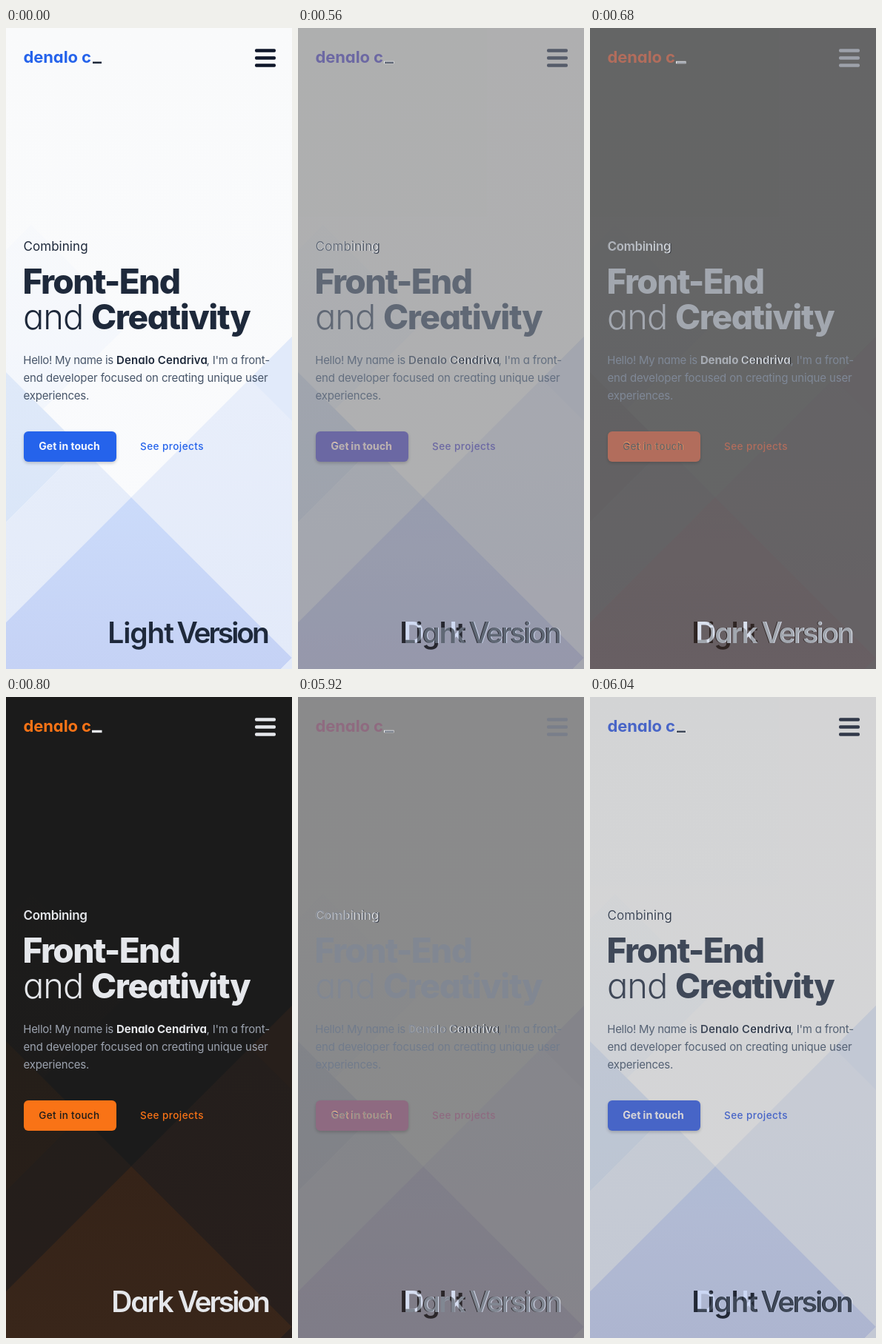
These frames come from a looping animation (386 by 866 pixels, 6100 ms). An HTML page:

```html
<!DOCTYPE html>
<html lang="en">
<head>
<meta charset="utf-8">
<title>Light and dark landing page</title>
<style>
  html, body { margin: 0; width: 100%; height: 100%; overflow: hidden; background: #f9fafc; }
  svg { position: absolute; left: 0; top: 0; width: 386px; height: 866px; }
  text {
    font-family: Inter, Lato, sans-serif;
    font-feature-settings: "cv11";
    font-optical-sizing: none;
    white-space: pre;
  }
</style>
</head>
<body>
<script>
const light = {
  id: 'light', bg: ['#f9fafb', '#fafbfd'], haze: '#eef3fc',
  left: ['#dfe9f9', '#dae6f8'], lowLeft: ['#e6edfa', '#e4ebf9'],
  right: ['#e9effb', '#e3eaf9'], corner: '#e1eafa', base: ['#cbdbfa', '#c5d2f5'],
  accent: '#2563eb', bars: '#0f172a', title: '#1e293b', body: '#475569',
  button: '#f4f7fd', shadow: 0.2,
  cursor: [117, 45.5, 12, 2.5],
  lead: [400, 0.05], name: [600, 0.1], call: [700, 14, 0],
  word: ['Light', 137.2, -1.1], shift: 0
};
const dark = {
  id: 'dark', bg: ['#1b1b1b', '#1b1b1b'], haze: '#1e1c1b',
  left: ['#241e19', '#281f19'], lowLeft: ['#231e1b', '#261e1b'],
  right: ['#231e1c', '#281f1c'], corner: '#271f1b', base: ['#352318', '#39261a'],
  accent: '#f97316', bars: '#e5e7eb', title: '#e5e7eb', body: '#9ca3af',
  button: '#1b1b1b', shadow: 0,
  cursor: [116, 44.8, 13.5, 3.4],
  lead: [600, -0.35], name: [700, -0.05], call: [500, 13.5, 0.35],
  word: ['Dark', 142.2, -2.1], shift: 1
};

const text = (str, x, y, size, weight, fill, gap = 0) =>
  `<text x="${x}" y="${y}" font-size="${size}" font-weight="${weight}" fill="${fill}" letter-spacing="${gap}">${str}</text>`;
const rect = (x, y, w, h, r, fill, more = '') =>
  `<rect x="${x}" y="${y}" width="${w}" height="${h}" rx="${r}" fill="${fill}" ${more}/>`;
const poly = (points, fill) => `<polygon points="${points}" fill="${fill}"/>`;

function page(t) {
  const fade = key => `<linearGradient id="${t.id}-${key}" x2="0" y2="1">
    <stop stop-color="${t[key][0]}"/><stop offset="1" stop-color="${t[key][1]}"/></linearGradient>`;
  const use = key => `url(#${t.id}-${key})`;
  const [leadW, leadGap] = t.lead, [nameW, nameGap] = t.name, [callW, callSize, callGap] = t.call;
  const [word, wordX, wordGap] = t.word;

  return `<svg id="${t.id}" viewBox="0 0 386 866">
    <defs>
      ${['bg', 'left', 'lowLeft', 'right', 'base'].map(fade).join('')}
      <linearGradient id="${t.id}-haze" x2="0" y2="1">
        <stop stop-color="${t.haze}" stop-opacity="0.2"/><stop offset="1" stop-color="${t.haze}" stop-opacity="0.6"/>
      </linearGradient>
      <filter id="${t.id}-soft" x="-20%" y="-50%" width="140%" height="200%"><feGaussianBlur stdDeviation="2"/></filter>
    </defs>
    ${rect(0, 0, 386, 866, 0, use('bg'))}
    ${poly('0,300 34,266 167,399 50,515 0,465', use('haze'))}
    ${poly('0,465 101.5,566.5 0,668', use('left'))}
    ${poly('0,668 101.5,566.5 169,634 0,803', use('lowLeft'))}
    ${poly('386,417 169,634 386,851', use('right'))}
    ${poly('386,417 329,474 386,531', t.corner)}
    ${poly('169,634 386,851 371,866 0,866 0,803', use('base'))}
    ${poly('386,851 371,866 386,866', t.right[1])}

    ${text('denalo c', 23.5, 47, 22, 700, t.accent, -0.1)}
    ${rect(...t.cursor, 0, t.title)}
    ${[28.25, 38.25, 48.25].map(y => rect(336, y, 28, 4.5, 1.8, t.bars)).join('')}

    ${text('Combining', 23.5, 300.5, 17, leadW, t.title, leadGap)}
    ${text('Front-End', 22.5, 359, 46, 800, t.title, -1.7)}
    ${text('and', 23, 407, 47, 300, t.title, -1)}
    ${text('Creativity', 115, 407, 46, 800, t.title, -1.4)}

    ${text('Hello! My name is', 23.3, 454, 15, 400, t.body, -0.3)}
    ${text('Denalo Cendriva', 149, 454, 15, nameW, t.title, nameGap)}
    ${text(", I'm a front-", 270.5, 454, 15, 400, t.body, -0.2)}
    ${text('end developer focused on creating unique user', 23.5, 478, 15, 400, t.body, -0.13)}
    ${text('experiences.', 23.5, 502, 15, 400, t.body, -0.2)}

    ${rect(24, 547, 125, 41, 6, '#000', `opacity="${t.shadow}" filter="url(#${t.id}-soft)"`)}
    ${rect(24, 545, 125, 41, 6, t.accent)}
    ${text('Get in touch', 44.3, 570.3, callSize, callW, t.button, callGap)}
    ${text('See projects', 181, 570.3, 13.5, 500, t.accent, 0.45)}

    ${text(word, wordX, 831, 39, 600, t.title, wordGap)}
    ${text('Version', 230.5 + t.shift, 831, 39, 600, t.title, -3.1)}
  </svg>`;
}

document.body.innerHTML = page(light) + page(dark);

// [time in ms, sixths of the dark page showing]
const loop = 6100;
const steps = [
  [0, 0], [500, 1], [560, 2], [620, 3], [680, 4], [740, 5], [800, 6],
  [5800, 5], [5860, 4], [5920, 3], [5980, 2], [6040, 1], [loop, 1]
];
document.getElementById('dark').animate(
  steps.map(([time, part]) => ({ offset: time / loop, opacity: part / 6, easing: 'steps(1, end)' })),
  { duration: loop, iterations: Infinity }
);
</script>
</body>
</html>
```
